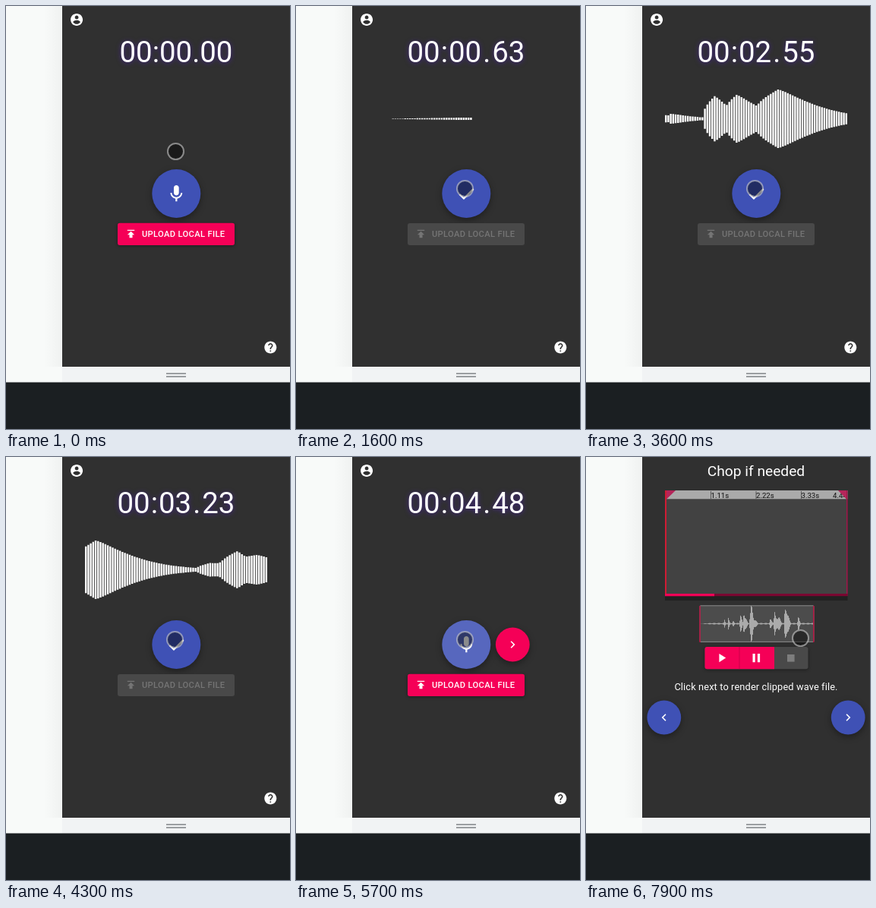
An HTML page for the animation above (8000 ms loop, 374 px wide and 557 px high).

```html
<!DOCTYPE html>
<html lang="en">
<head>
<meta charset="utf-8">
<title>Voice recorder</title>
<style>
  html, body { margin: 0; width: 100%; height: 100%; overflow: hidden; background: #303030; }
  svg { display: block; width: 100vw; height: 100vh; }
  text { font-family: Roboto, "Open Sans", sans-serif; fill: #fff; }
  .mid { text-anchor: middle; }
  .icon { fill: #fff; }
  .blue { fill: #3f51b5; }
  .red { fill: #f50057; }
  .raised { filter: drop-shadow(0 3px 4px rgba(0, 0, 0, .36)); }
  .low { filter: drop-shadow(0 1px 2px rgba(0, 0, 0, .4)); }
  .label { font-size: 11.2px; font-weight: 500; letter-spacing: .32px; }
  .tick { font-size: 9.6px; fill: #111; }
  #timer { font-size: 38.4px; filter: drop-shadow(0 1px 3px rgba(80, 20, 220, .5)); }
</style>
</head>
<body>
<svg viewBox="0 0 374 557" preserveAspectRatio="none">
  <defs>
    <linearGradient id="edge"><stop stop-opacity="0"/><stop offset="1" stop-opacity=".035"/></linearGradient>
    <clipPath id="ruler"><rect x="104" y="44" width="240" height="12"/></clipPath>
    <path id="account" d="M12 2C6.48 2 2 6.48 2 12s4.48 10 10 10 10-4.48 10-10S17.52 2 12 2zm0 3c1.66 0 3 1.34 3 3s-1.34 3-3 3-3-1.34-3-3 1.34-3 3-3zm0 14.2c-2.5 0-4.71-1.28-6-3.22.03-1.99 4-3.08 6-3.08 1.99 0 5.97 1.09 6 3.08-1.29 1.94-3.5 3.22-6 3.22z"/>
    <path id="help" d="M12 2C6.48 2 2 6.48 2 12s4.48 10 10 10 10-4.48 10-10S17.52 2 12 2zm1 17h-2v-2h2v2zm2.07-7.75l-.9.92C13.45 12.9 13 13.5 13 15h-2v-.5c0-1.1.45-2.1 1.17-2.83l1.24-1.26c.37-.36.59-.86.59-1.41 0-1.1-.9-2-2-2s-2 .9-2 2H8c0-2.21 1.79-4 4-4s4 1.79 4 4c0 .88-.36 1.68-.93 2.25z"/>
    <path id="next" d="M10 6L8.59 7.41 13.17 12l-4.58 4.59L10 18l6-6z"/>
    <g id="upload">
      <path d="M5 4v2h14V4H5zm0 10h4v6h6v-6h4l-7-7-7 7z" transform="translate(156.5 292) scale(.667)"/>
      <text class="label" x="179" y="304" style="fill:inherit">UPLOAD LOCAL FILE</text>
    </g>
  </defs>

  <rect width="374" height="557" fill="#f8faf9"/>
  <rect x="50" width="24" height="475" fill="url(#edge)"/>
  <rect x="74" width="300" height="475" fill="#303030"/>
  <rect x="74" y="475" width="300" height="21" fill="#f1f3f4"/>
  <path d="M211 484h26M211 488h26" stroke="#9b9ea1" stroke-width="2"/>
  <rect y="495.5" width="374" height="62" fill="#1b1f22"/>

  <g id="recorder">
    <use href="#account" class="icon" transform="translate(83.5 8.5) scale(.8)"/>
    <use href="#help" class="icon" transform="translate(338.7 439.9) scale(.8)"/>
    <text id="timer" class="mid" x="224" y="74"></text>
    <path id="wave" fill="#fff"/>
    <circle class="blue raised" cx="224.3" cy="247" r="32"/>
    <circle id="ripple" cx="224.3" cy="247" fill="#fff"/>
    <g class="icon" transform="translate(210.9 233.8) scale(1.12)">
      <path id="mic" d="M12 14c1.66 0 2.99-1.34 2.99-3L15 5c0-1.66-1.34-3-3-3S9 3.34 9 5v6c0 1.66 1.34 3 3 3zm5.3-3c0 3-2.54 5.1-5.3 5.1S6.7 14 6.7 11H5c0 3.41 2.72 6.23 6 6.72V21h2v-3.28c3.28-.48 6-3.3 6-6.72h-1.7z"/>
      <path id="check" d="M9 16.17L4.83 12l-1.42 1.41L9 19 21 7l-1.41-1.41z"/>
    </g>
    <g fill="#757575">
      <rect x="147" y="286" width="154" height="29" rx="3" fill="#494949"/>
      <use href="#upload"/>
    </g>
    <g id="uploadOn" class="icon">
      <rect class="red low" x="147" y="285.7" width="154" height="29.3" rx="3"/>
      <use href="#upload"/>
    </g>
    <g id="proceed">
      <circle class="red raised" cx="285.3" cy="247" r="22.4"/>
      <use href="#next" class="icon" transform="translate(275.7 237.4) scale(.8)"/>
    </g>
  </g>

  <g id="editor">
    <text class="mid" x="224" y="25" font-size="19.2">Chop if needed</text>
    <rect x="104" y="44" width="240.5" height="145" fill="#212121"/>
    <rect x="104" y="44" width="240.5" height="136" fill="#424242"/>
    <rect x="104" y="44" width="240.5" height="11.3" fill="#aaa"/>
    <g id="ticks" clip-path="url(#ruler)"></g>
    <path d="M105 44h13l-12 11.5zM344 44h-12l11 11.5z" fill="#b4265a"/>
    <rect x="104" y="44" width="2" height="139" fill="#d01c34"/>
    <rect x="343" y="44" width="1.5" height="139" fill="#a01548"/>
    <rect x="104" y="180" width="240.5" height="3.2" fill="#7a0731"/>
    <rect class="red" x="104" y="180" width="65" height="3.2"/>
    <rect x="150" y="195.8" width="150" height="47.6" rx="1" fill="#4c4c4c" stroke="#8a8a8a"/>
    <path id="overview" stroke="#aaa"/>
    <path d="M150 196v48M299.8 196v48" stroke="#b5123f" stroke-width="1.5"/>
    <g class="low">
      <rect x="156.5" y="250" width="136" height="29.3" rx="3" fill="#494949"/>
      <path class="red" d="M248 250h-88.5a3 3 0 0 0-3 3v23.3a3 3 0 0 0 3 3h88.5z"/>
    </g>
    <path d="M202 250v29.3" stroke="#c30048" stroke-width=".8"/>
    <path class="icon" d="M8 5v14l11-7z" transform="translate(169 255) scale(.8)"/>
    <path class="icon" d="M6 5h4v14H6zM14 5h4v14h-4z" transform="translate(214.7 255) scale(.8)"/>
    <rect x="265" y="260" width="9.6" height="9.6" fill="#7d7d7d"/>
    <text class="mid" x="224" y="307" font-size="12.8" letter-spacing=".12">Click next to render clipped wave file.</text>
    <circle class="blue raised" cx="102.8" cy="343" r="22.4"/>
    <circle class="blue raised" cx="345.2" cy="343" r="22.4"/>
    <use href="#next" class="icon" transform="translate(112.4 333.4) scale(-.8 .8)"/>
    <use href="#next" class="icon" transform="translate(335.6 333.4) scale(.8)"/>
  </g>

  <circle id="cursor" r="10.5" fill="rgba(0,0,0,.45)" stroke="rgba(205,205,205,.6)" stroke-width="2"/>
</svg>
<script>
const $ = id => document.getElementById(id);
const LOOP = 8000, STEP = 100;
const PRESS = 900, START = 1000, RELEASE = 5500, STOP = 5600, EDIT = 7900;
const VISIBLE = 75, LEFT = 104, WIDTH = 240, BAR = 2.4, AXIS = 148.5;
const PITCH = (WIDTH - BAR) / (VISIBLE - 1);
const BARS_PER_SECOND = 62.2, TOTAL_BARS = 279;

// Recorded seconds at a few moments of the loop; the page stalls briefly at 2400
const CLOCK = [[970, 0], [2400, 1.43], [2600, 1.43], [2900, 1.83], [3600, 2.55], [5000, 3.91], [STOP, 4.48]];

// Spoken syllables: bar of the peak, half height, bars to rise, bars to fade
const SYLLABLES = [
  [64, 11, 2, 10], [74, 11.5, 2, 11], [86, 6.5, 2, 11], [104, 29.7, 5, 8],
  [113, 31.5, 6, 12], [130, 38.5, 11, 19], [177, 9, 6, 25], [188, 24.3, 8, 8],
  [196, 19.5, 20, 16], [217, 42.5, 15.5, 12.4], [246, 14, 6.5, 10],
];

const clamp = v => Math.max(0, Math.min(1, v));
const progress = (t, from, to) => clamp((t - from) / (to - from));
const smooth = u => u * u * (3 - 2 * u);
const outBack = u => 1 + 2.7 * (u - 1) ** 3 + 1.7 * (u - 1) ** 2;

function secondsAt(t) {
  let seconds = 0;
  for (let i = 1; i < CLOCK.length; i++) {
    const [t0, s0] = CLOCK[i - 1], [t1, s1] = CLOCK[i];
    seconds += (s1 - s0) * progress(t, t0, t1);
  }
  return seconds;
}

function loudness(bar, sharpness = 1) {
  const pulses = SYLLABLES.map(([peak, height, rise, fade]) => {
    const d = (bar - peak) * sharpness;
    return height * (d < 0 ? Math.sqrt(clamp(1 + d / rise)) : Math.exp(-((d / fade) ** 1.3)));
  });
  return Math.max(1.5 * progress(bar, 4, 35), ...pulses);
}

function wavePath(count) {
  const first = Math.max(0, count - VISIBLE);
  let d = '';
  for (let i = first; i < count; i++) {
    const h = loudness(i);
    d += `M${LEFT + (i - first) * PITCH} ${AXIS - h}h${BAR}v${2 * h}h${-BAR}z`;
  }
  return d;
}

function timerMarkup(seconds, spaced) {
  const cents = Math.floor(seconds * 100 + 1e-6);
  const two = n => String(n).padStart(2, '0');
  const mark = (sign, next, gap) => `<tspan dx="${gap}">${sign}</tspan><tspan dx="${gap}">${next}</tspan>`;
  return '00' + mark(':', two(Math.floor(cents / 100)), spaced ? 1 : 0) + mark('.', two(cents % 100), spaced ? 2 : 0);
}

function drawEditor() {
  let ticks = '', lines = '';
  for (let i = 1; i <= 4; i++) {
    const x = 105 + i * 59.5;
    ticks += `<path d="M${x} 45v10" stroke="#444" stroke-width=".8"/>` +
      `<text class="tick" x="${Math.min(x, 325)}" y="53.7">${(i * 1.11).toFixed(2)}s</text>`;
  }
  for (let x = 151; x < 299; x++) {
    const bar = (x - 147) / 150 * TOTAL_BARS;
    const h = Math.min(23.5, .6 * loudness(bar, 2.5) * (.85 + .3 * Math.sin(x * 7.3)));
    lines += `M${x + .5} ${219.5 - h}v${2 * h}`;
  }
  $('ticks').innerHTML = ticks;
  $('overview').setAttribute('d', lines);
}

function set(id, attributes) {
  for (const name in attributes) $(id).setAttribute(name, attributes[name]);
}

function show(id, on) {
  $(id).style.display = on ? '' : 'none';
}

function render(now) {
  const t = Math.floor((now % LOOP) / STEP) * STEP;
  const recording = t >= START && t < STOP;
  const editing = t >= EDIT;
  show('recorder', !editing);
  show('editor', editing);
  show('mic', !recording);
  show('check', recording);
  show('proceed', t >= STOP);

  const seconds = secondsAt(t);
  $('timer').innerHTML = timerMarkup(seconds, t >= START);
  set('wave', { d: recording ? wavePath(Math.floor(BARS_PER_SECOND * seconds + 1)) : '' });
  set('uploadOn', { opacity: 1 - progress(t, PRESS, PRESS + 250) + progress(t, RELEASE, RELEASE + 200) });

  const age = t - (t < RELEASE ? PRESS : RELEASE);
  set('ripple', {
    r: 32 * Math.sqrt(progress(age, -100, 200)),
    opacity: age < 0 ? 0 : .14 * (1 - progress(age, 150, 600)),
  });

  const reach = outBack(progress(t, 100, 500));
  set('cursor', {
    cx: 223.5 - reach + 60 * smooth(progress(t, 6700, 7300)),
    cy: 191.5 + 49 * reach - 2 * smooth(progress(t, 6700, 7300)),
  });
}

drawEditor();
const begin = performance.now();
function frame() {
  render(performance.now() - begin);
  requestAnimationFrame(frame);
}
frame();
</script>
</body>
</html>
```
